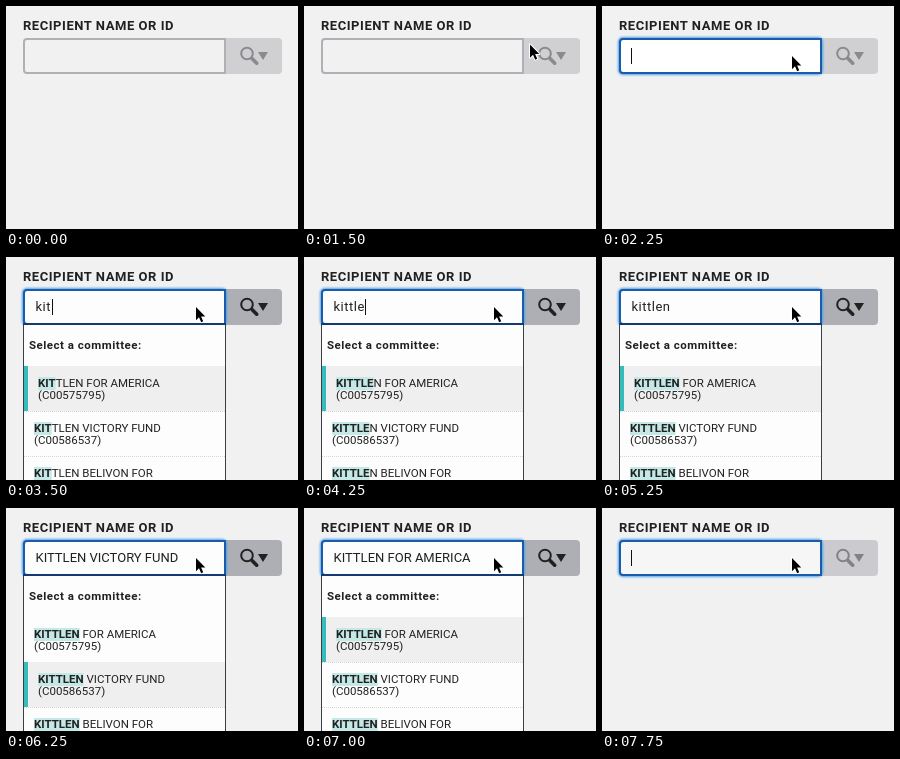
Write an HTML page that moves like this. It is 292 px wide and 223 px high and loops after 8000 ms.

```html
<!DOCTYPE html>
<html lang="en">
<head>
<meta charset="utf-8">
<title>Recipient search</title>
<style>
html, body { margin: 0; width: 100%; height: 100%; overflow: hidden; background: #f1f1f1; }
svg { display: block; font-family: Roboto, Arial, sans-serif; }
text { fill: #212121; white-space: pre; }
.bold { font-weight: 700; }
.item { font-size: 11.5px; }
</style>
</head>
<body>
<svg width="292" height="223" viewBox="0 0 292 223">
  <defs>
    <filter id="blur" x="-10%" y="-30%" width="120%" height="160%"><feGaussianBlur stdDeviation="1"/></filter>
  </defs>
  <rect width="292" height="223" fill="#f1f1f1"/>
  <text class="bold" x="17" y="24" font-size="13" letter-spacing=".55">RECIPIENT NAME OR ID</text>

  <path id="button" d="M219 32H272a4 4 0 0 1 4 4V64a4 4 0 0 1-4 4H219Z"/>
  <g id="icon">
    <circle cx="241" cy="47.5" r="5.8" fill="none" stroke="currentColor" stroke-width="2"/>
    <path d="M246 52.5L250.7 57.2" stroke="currentColor" stroke-width="3.6" stroke-linecap="round"/>
    <path d="M252 46H262L257 54Z" fill="currentColor"/>
  </g>

  <rect id="glow" x="16" y="31" width="205" height="38" rx="5" fill="#4aa3ec" filter="url(#blur)"/>
  <path id="field" d="M219 33V67H21a3 3 0 0 1-3-3V36a3 3 0 0 1 3-3Z" stroke-width="2"/>
  <text id="typed" x="29.5" y="54" font-size="13"></text>
  <rect id="caret" y="42" width="1" height="16" fill="#111"/>

  <g id="menu">
    <rect x="17.5" y="67.5" width="202" height="170" fill="#fdfdfd" stroke="#3b3f45"/>
    <path d="M17 67H220" stroke="#123a73" stroke-width="2"/>
    <text class="bold" x="23" y="92" font-size="11.5" letter-spacing=".5">Select a committee:</text>
    <g id="items"></g>
  </g>

  <path id="pointer" d="M0 0V13.2L3 10.3 5.2 15.2 7.2 14.3 5.1 9.5H9.3Z" fill="#000" stroke="#fff" stroke-width="2" paint-order="stroke" stroke-linejoin="round"/>
</svg>
<script>
const LOOP = 8000;
const $ = id => document.getElementById(id);
const NS = 'http://www.w3.org/2000/svg';
const committees = [
  ['KITTLEN FOR AMERICA', '(C00575795)'],
  ['KITTLEN VICTORY FUND', '(C00586537)'],
  ['KITTLEN BELIVON FOR', '']
];

const themes = {
  idle: { button: '#d0d0d2', icon: '#888a8d', fill: '#f1f1f1' },
  focus: { button: '#d0d0d2', icon: '#888a8d', fill: '#fff' },
  active: { button: '#aeafb4', icon: '#212121', fill: '#fdfdfd' },
  fading: { button: '#bdbdc1', icon: '#57595c', fill: '#fafafa' },
  cleared: { button: '#cbcbcf', icon: '#808286', fill: '#f6f6f6' }
};

// Each step overrides the state left by the ones before it.
const steps = [
  [0, { theme: 'idle', text: '', caret: false, hit: 0, selected: 0, mouse: null }],
  [1500, { mouse: [226, 38.5] }],
  [1750, { mouse: [195, 48.5] }],
  [2000, { mouse: [190, 50] }],
  [2250, { theme: 'focus', caret: true }],
  [2750, { caret: false }],
  [3000, { text: 'k', caret: true }],
  [3250, { text: 'ki' }],
  [3500, { text: 'kit', hit: 3, theme: 'active' }],
  [4000, { text: 'kitt', hit: 4 }],
  [4250, { text: 'kittle', hit: 6 }],
  [4750, { text: 'kittlen', hit: 7 }],
  [5250, { caret: false }],
  [5750, { text: committees[1][0], selected: 1, caret: true }],
  [6250, { caret: false }],
  [6500, { text: committees[0][0], selected: 0, caret: true }],
  [7000, { caret: false }],
  [7250, { text: '', hit: 0 }],
  [7500, { theme: 'fading', caret: true }],
  [7750, { theme: 'cleared' }]
];

function add(parent, tag, attrs = {}) {
  const el = document.createElementNS(NS, tag);
  set(el, attrs);
  return parent.appendChild(el);
}

function set(el, attrs) {
  for (const key in attrs) el.setAttribute(key, attrs[key]);
}

function show(el, on) {
  el.style.display = on ? '' : 'none';
}

const rows = committees.map(([name, code], i) => {
  const top = 109 + 45 * i;
  const g = add($('items'), 'g');
  const back = add(g, 'rect', { x: 18, y: top, width: 201, height: 45, fill: '#efefef' });
  const bar = add(g, 'rect', { x: 18, y: top, width: 4, height: 45, fill: '#36bdbb' });
  add(g, 'path', { d: `M18 ${top + 45.5}H219`, stroke: '#d4d6d8', 'stroke-dasharray': '1 1' });
  const mark = add(g, 'rect', { y: top + 11, height: 13, fill: '#c4e8e6' });
  const title = add(g, 'text', { class: 'item', y: top + 21 });
  const match = add(title, 'tspan', { class: 'bold' });
  const rest = add(title, 'tspan');
  const id = add(g, 'text', { class: 'item', y: top + 33 });
  id.textContent = code;
  return { name, back, bar, mark, title, match, rest, id };
});

function drawRow(row, hit, selected) {
  const x = selected ? 32 : 28;
  show(row.back, selected);
  show(row.bar, selected);
  row.match.textContent = row.name.slice(0, hit);
  row.rest.textContent = row.name.slice(hit);
  set(row.title, { x });
  set(row.id, { x });
  set(row.mark, { x, width: row.match.getComputedTextLength() });
}

function draw(s) {
  const theme = themes[s.theme];
  const focused = s.theme !== 'idle';
  const lower = s.text === s.text.toLowerCase();
  set($('button'), { fill: theme.button });
  set($('icon'), { color: theme.icon });
  set($('field'), { fill: theme.fill, stroke: focused ? '#1a5cab' : '#aeb0b5' });
  show($('glow'), focused);

  $('typed').textContent = s.text;
  set($('typed'), { 'letter-spacing': lower ? 0.5 : 0 });
  const width = s.text ? $('typed').getComputedTextLength() : 0;
  set($('caret'), { x: 29 + (s.text ? Math.round(width) + 1 : 0) });
  show($('caret'), s.caret);

  show($('menu'), s.hit > 0);
  if (s.hit) rows.forEach((row, i) => drawRow(row, s.hit, i === s.selected));

  show($('pointer'), s.mouse);
  if (s.mouse) set($('pointer'), { transform: `translate(${s.mouse})` });
}

const start = performance.now();

function tick() {
  const t = (performance.now() - start) % LOOP;
  const past = steps.filter(([at]) => at <= t).map(([, change]) => change);
  draw(Object.assign({}, ...past));
  requestAnimationFrame(tick);
}
tick();
</script>
</body>
</html>
```
